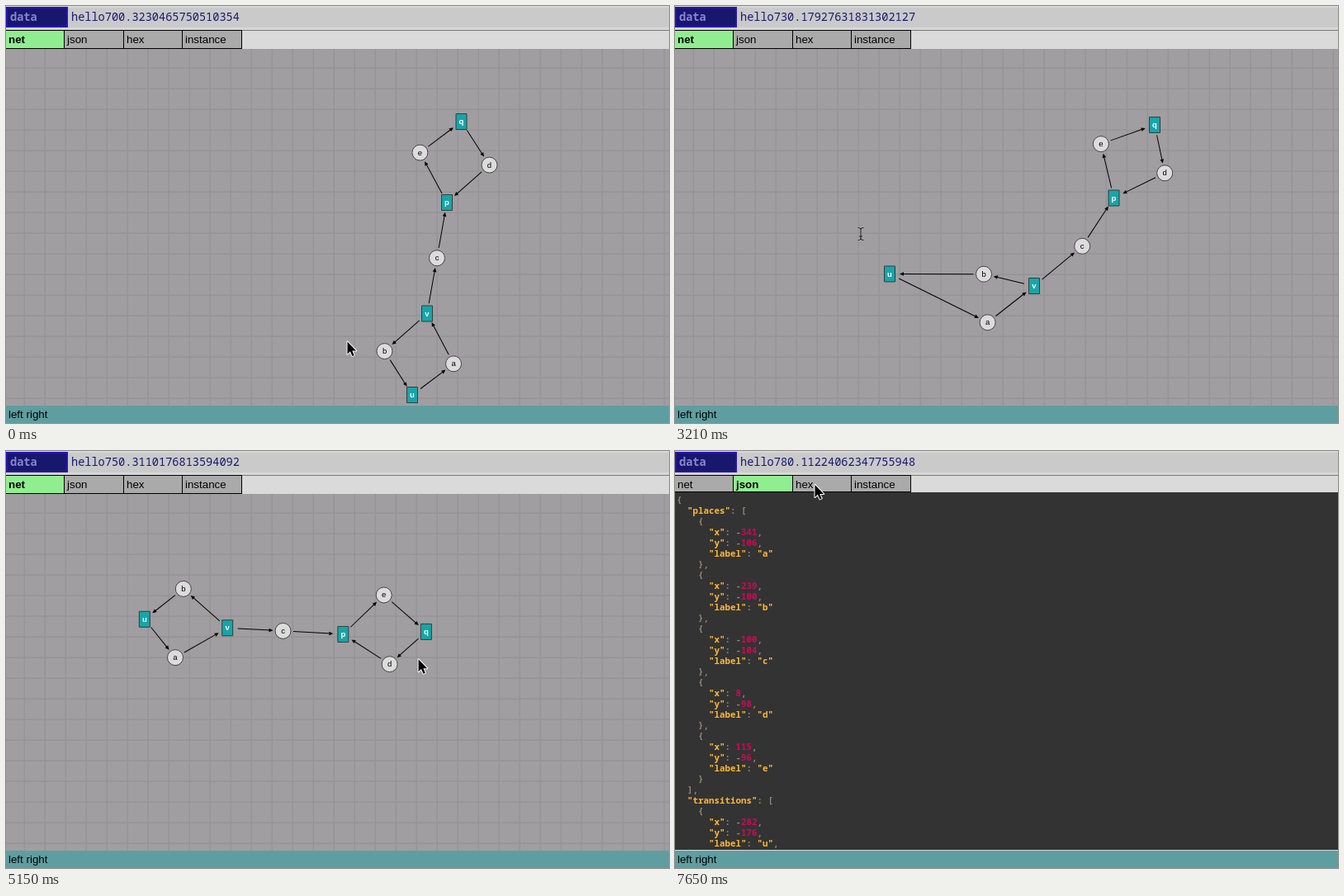
These frames come from a looping animation (803 by 505 pixels, 8 s). An HTML page with a canvas:

```html
<!DOCTYPE html>
<html lang="en">
<head>
<meta charset="utf-8">
<title>Net editor</title>
<style>
html, body { margin: 0; width: 100%; height: 100%; overflow: hidden; background: #a09ea0; }
canvas { display: block; }
</style>
</head>
<body>
<canvas id="stage" width="803" height="505"></canvas>
<script>
const ctx = document.getElementById('stage').getContext('2d');
const W = 803, H = 505, LOOP = 8000, STEP = 800 / 9, JSON_AT = 7000, LAG = 160;
const SANS = '"Liberation Sans", Arial, sans-serif';
const MONO = '"Noto Sans Mono", "DejaVu Sans Mono", monospace';

const PLACES = 'abcde', NAMES = 'abcdeuvpq';
const ARCS = ['ua', 'av', 'vb', 'bu', 'vc', 'cp', 'pe', 'eq', 'qd', 'dp'];

const key = (t, ease, ...at) => ({ t, ease, at });

// the four transitions u, v, p, q; the places follow from them
const REST = [156.5, 202, 258, 216, 404, 219, 505.5, 202];
const CHAIN = [
  key(1689, 1, 492, 471, 510, 372.5, 534, 238, 551.5, 140),
  key(2489, 1, 449.5, 456, 508, 372.5, 534, 237.5, 553, 139.5),
  key(3200, 1.2, 260, 324.5, 435, 339, 531.5, 232.5, 581, 144),
  key(3644, 0.5, 124, 190, 262, 212, 440, 225, 538, 218),
  key(4050, 0.7, ...REST),
  key(4800, 1, ...REST),
  key(5500, 0.8, 176, 205, 275.5, 213, 411.5, 224, 511.3, 231)
];

const POINTER = [
  key(160, 1, 413.5, 406.5), key(800, 0.8, 490, 477), key(1700, 1, 486, 476),
  key(2489, 1, 443, 451), key(3200, 1.2, 225, 276), key(3600, 0.7, 100, 182),
  key(4267, 2, 514, 201), key(4800, 1, 514, 201), key(5244, 1, 496, 265),
  key(5600, 1, 514, 238), key(5689, 1, 500.5, 230), key(6400, 0.8, 90, 39),
  key(6667, 1, 90, 43), key(7200, 1, 90, 43), key(7644, 0.8, 169.5, 41)
];

const READINGS = [
  '0.3230465750510354', '0.6418207395162843', '0.8502947163058274',
  '0.17927631831302127', '0.5274931860427195', '0.3110176813594092',
  '0.20826128253835896', '0.8071605766935424', '0.11224062347755948'
];

const mix = (a, b, p) => a.map((v, i) => v + (b[i] - v) * p);

function sample(keys, t) {
  const i = keys.findIndex(k => k.t > t);
  if (i <= 0) return keys.at(i).at;
  const a = keys[i - 1], b = keys[i];
  return mix(a.at, b.at, ((t - a.t) / (b.t - a.t)) ** b.ease);
}

function chainAt(t) {
  const s = sample(CHAIN, t);
  return { u: s.slice(0, 2), v: s.slice(2, 4), p: s.slice(4, 6), q: s.slice(6, 8) };
}

// the two places beside a pair of transitions, closer together as it stretches
function sides(from, to, middle) {
  const dx = to[0] - from[0], dy = to[1] - from[1];
  const k = 4250 / (dx * dx + dy * dy);
  const [x, y] = mix(from, to, middle);
  return [[x - dy * k, y + dx * k], [x + dy * k, y - dx * k]];
}

function layout(t) {
  const late = chainAt(t - LAG);
  const [a, b] = sides(late.u, late.v, 0.46);
  const [d, e] = sides(late.p, late.q, 0.54);
  return { ...chainAt(t), a, b, c: mix(late.v, late.p, 0.5), d, e };
}

function rect(x, y, w, h, fill) {
  ctx.fillStyle = fill;
  ctx.fillRect(x, y, w, h);
}

function text(str, x, y, font, fill, align = 'left') {
  ctx.font = font;
  ctx.fillStyle = fill;
  ctx.textAlign = align;
  ctx.fillText(str, x, y);
}

function polygon(points) {
  ctx.beginPath();
  points.forEach(([x, y]) => ctx.lineTo(x, y));
  ctx.closePath();
}

function drawHeader(t, json) {
  rect(0, 0, W, 30, '#d8d8d8');
  rect(75, 2, W - 75, 24, '#cacaca');
  rect(0, 29, W, 1, '#777');
  rect(0, 1, 75, 25, '#2812b4');
  rect(2, 3, 71, 21, '#17176e');
  text('data', 5, 18, `bold 13.6px ${MONO}`, '#8c86d0');
  const n = Math.min(READINGS.length - 1, Math.floor((t + 620) / 1000));
  text('hello' + (70 + n) + READINGS[n], 79, 18, `13.6px ${MONO}`, '#191970');

  const bottom = json ? 50 : 52;
  rect(0, 30, W, bottom - 30, '#dadada');
  ['net', 'json', 'hex', 'instance'].forEach((name, i) => {
    const x = Math.floor(i * 71.5), end = Math.floor((i + 1) * 71.5);
    const on = name === (json ? 'json' : 'net');
    rect(x, 29, end - x, bottom - 29, '#000');
    rect(x, 30, end - x - 1, bottom - 31, on ? '#90ee90' : '#aaa');
    text(name, x + 3, 45, `${on ? 'bold ' : ''}13.33px ${SANS}`, '#000');
  });
}

function drawArc([x, y], [toX, toY]) {
  const dx = toX - x, dy = toY - y, len = Math.hypot(dx, dy);
  ctx.save();
  ctx.translate(x, y);
  ctx.rotate(Math.atan2(dy, dx));
  ctx.strokeStyle = ctx.fillStyle = '#000';
  ctx.lineWidth = 1;
  ctx.beginPath();
  ctx.moveTo(12.5, 0);
  ctx.lineTo(len - 15, 0);
  ctx.stroke();
  polygon([[len - 12, 0], [len - 17, -2.3], [len - 17, 2.3]]);
  ctx.fill();
  ctx.restore();
}

function drawNode(name, [x, y]) {
  const place = PLACES.includes(name);
  ctx.beginPath();
  if (place) ctx.arc(x, y, 9.5, 0, Math.PI * 2);
  else ctx.rect(x - 6.5, y - 9.5, 13, 19);
  ctx.fillStyle = place ? '#dcdcdc' : '#17a5a8';
  ctx.strokeStyle = place ? '#444' : '#343c3c';
  ctx.lineWidth = 1;
  ctx.fill();
  ctx.stroke();
  text(name, x, y + 3, `${place ? '' : 'bold '}9.5px ${SANS}`, place ? '#000' : '#fff', 'center');
}

function drawNet(t) {
  rect(0, 52, W, 432, '#a09ea0');
  for (let x = 21.5; x < W; x += 25) rect(x, 52, 1.5, 432, '#969496');
  for (let y = 74.5; y < 484; y += 25) rect(0, y, W, 1.5, '#969496');
  const nodes = layout(t);
  for (const [from, to] of ARCS) drawArc(nodes[from], nodes[to]);
  for (const name of NAMES) drawNode(name, nodes[name]);
}

const node = (label, x, y) => ({ x, y, label });
const LINES = JSON.stringify({
  places: [node('a', -341, -106), node('b', -239, -100), node('c', -100, -104),
    node('d', 8, -98), node('e', 115, -96)],
  transitions: [{ ...node('u', -282, -176), type: 1 }]
}, null, 2).split('\n').slice(0, 33);

function drawJson() {
  rect(0, 50, W, 433, '#333');
  rect(0, 483, W, 1, '#dadada');
  LINES.forEach((line, row) => {
    for (const { 0: s, index } of line.matchAll(/"[^"]*"|\d+|[^\s"\d]/g)) {
      const fill = s[0] === '"' ? '#fdb833' : /\d/.test(s) ? '#cb0a58' : '#8f8772';
      text(s, 2 + index * 6.5, 63 + row * 13, `bold 10.83px ${MONO}`, fill);
    }
  });
}

function drawBeam() {
  ctx.beginPath();
  for (const s of [-1, 1]) {
    ctx.moveTo(-3.5, s * 7.5);
    ctx.quadraticCurveTo(0, s * 7.5, 0, s * 5);
    ctx.quadraticCurveTo(0, s * 7.5, 3.5, s * 7.5);
  }
  ctx.moveTo(0, -6);
  ctx.lineTo(0, 6);
  ctx.moveTo(-2, 3);
  ctx.lineTo(2, 3);
  for (const [width, color] of [[2.2, 'rgba(255,255,255,.4)'], [1.1, '#111']]) {
    ctx.lineWidth = width;
    ctx.strokeStyle = color;
    ctx.stroke();
  }
}

function drawArrow() {
  polygon([[0, 0], [0, 15], [3.4, 11.8], [5.9, 17.4], [8.2, 16.4], [5.8, 11], [10.6, 11]]);
  ctx.lineWidth = 2;
  ctx.strokeStyle = '#fff';
  ctx.stroke();
  ctx.fillStyle = '#000';
  ctx.fill();
}

function drawPointer(t) {
  const beam = (t > 1600 && t < 3800) || (t > 6300 && t < 7250);
  ctx.save();
  ctx.translate(...sample(POINTER, t));
  ctx.lineJoin = 'round';
  if (beam) drawBeam();
  else drawArrow();
  ctx.restore();
}

function draw(now) {
  const time = now % LOOP, json = time >= JSON_AT;
  // the picture is refreshed about eleven times a second
  const t = Math.floor((time + 30) / STEP) * STEP;
  if (json) drawJson();
  else drawNet(t);
  drawHeader(t, json);
  rect(0, 484, W, H - 484, '#5f9ea0');
  text('left right', 3, 499, `13.33px ${SANS}`, '#000');
  drawPointer(t);
}

const start = performance.now();
function tick() {
  draw(performance.now() - start);
  requestAnimationFrame(tick);
}
tick();
</script>
</body>
</html>
```
